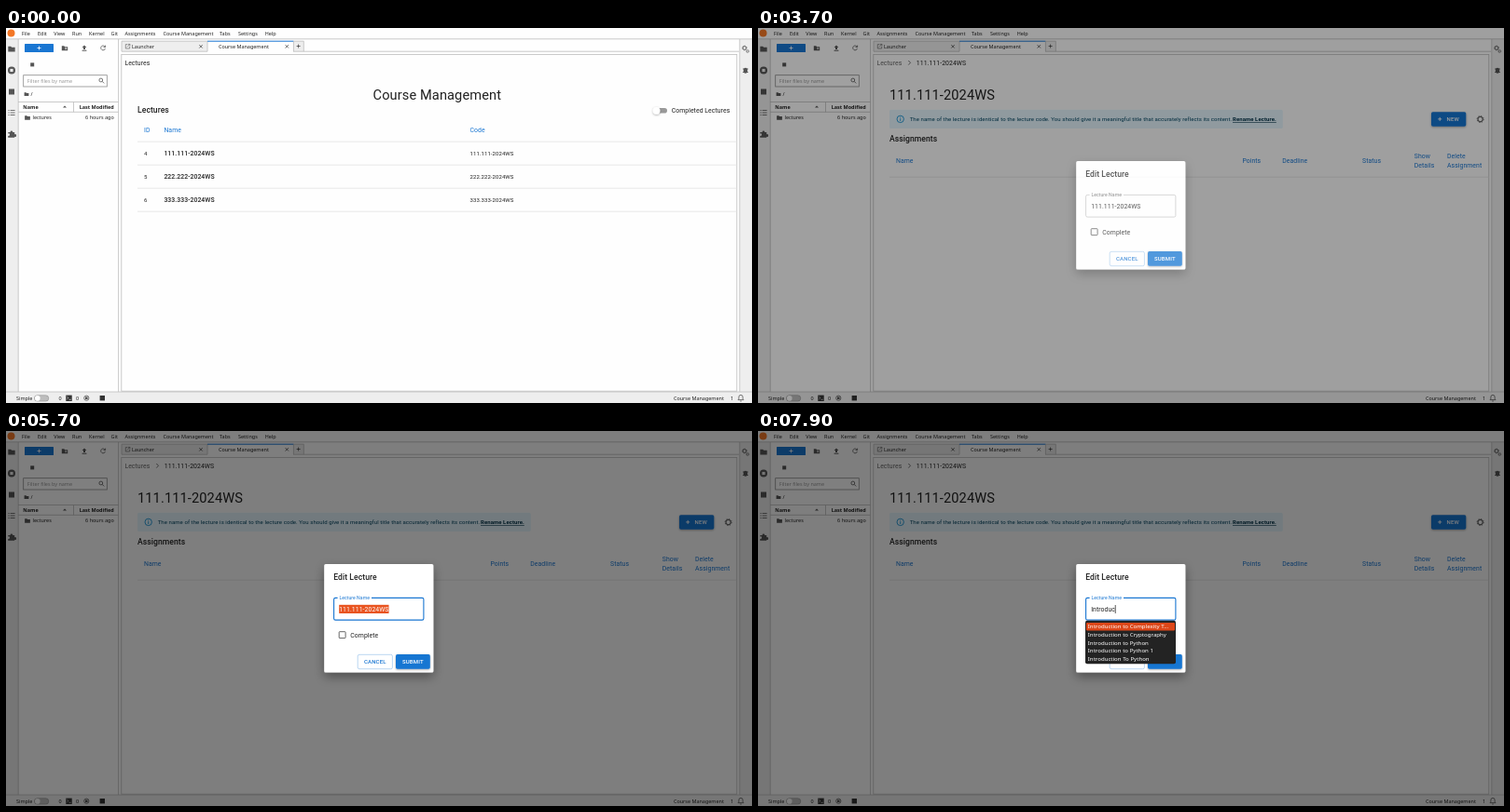
An HTML page that plays this animation: 800x403 px, repeating every 8 s.

```html
<!DOCTYPE html>
<html lang="en">
<head>
<meta charset="utf-8">
<title>Rename a lecture</title>
<style>
  html, body { margin: 0; width: 100%; height: 100%; overflow: hidden; background: #fff; }
  svg { display: block; width: 100vw; height: 100vh; }
  text { white-space: pre; }
  .ui { font: 5.46px "Noto Sans", "Open Sans", sans-serif; fill: #212121; }
  .bold { font-weight: 600; }
  .mui { font: 6.86px Roboto, sans-serif; letter-spacing: .00938em; fill: #212121; }
  .mui.h4 { font-size: 14.6px; letter-spacing: .00735em; }
  .mui.h6 { font-size: 8.58px; font-weight: 500; letter-spacing: .0075em; }
  .mui.small { font-size: 6.02px; letter-spacing: .01071em; }
  .mui.label { font-size: 5.14px; }
  .mui.medium { font-weight: 500; }
  .mui.button { font-size: 6.02px; font-weight: 500; letter-spacing: .02857em; }
  .mui.blue { fill: #1976d2; }
  .mui.gray { fill: #666; }
  .mui.white { fill: #fff; }
  .rule { stroke: #e0e0e0; stroke-width: .7; }
  .edge { stroke: #bdbdbd; stroke-width: .8; fill: none; }
  .icon { fill: #555; }
  .line { fill: none; stroke: #555; stroke-width: .8; }
  .strip { fill: #eee; }
  .menu { font: 6.1px "Noto Sans", "Open Sans", sans-serif; fill: #fff; }
</style>
</head>
<body>
<svg viewBox="0 0 800 403" preserveAspectRatio="none">
  <defs>
    <path id="folder" d="M-3.2-2.4h2.5l.8.9h3.1v4h-6.4z"/>
    <path id="cross" d="M-1.7-1.7 1.7 1.7M1.7-1.7-1.7 1.7"/>
    <path id="plus" d="M-2 0h4M0-2v4"/>
    <g id="gear">
      <circle r="2.6" fill="none" stroke-width="1.3"/>
      <circle r="3.5" fill="none" stroke-width="1" stroke-dasharray="1.3 1.45"/>
    </g>
    <filter id="lift" x="-30%" y="-30%" width="160%" height="170%">
      <feDropShadow dx="0" dy="4.5" stdDeviation="6" flood-opacity=".38"/>
    </filter>
    <filter id="soft" x="-30%" y="-30%" width="160%" height="180%">
      <feDropShadow dx="0" dy=".8" stdDeviation=".8" flood-opacity=".35"/>
    </filter>
  </defs>

  <rect width="800" height="403" fill="#fefefe"/>

  <!-- Window frame -->
  <path class="strip" d="M0 12h13v379H0zM787 12h13v379h-13zM0 391h800v12H0z"/>
  <path class="edge" d="M0 11.8H800M13.2 12V391M120.6 12V391M786.8 12V391M0 391H800"/>
  <circle cx="5.5" cy="5.5" r="4" fill="#f37726"/>
  <g class="ui" id="menubar"></g>

  <!-- Side strips -->
  <use href="#folder" class="icon" transform="translate(6 22.5) scale(1.15)"/>
  <circle cx="6" cy="45.5" r="4" class="icon"/><rect x="4.4" y="43.9" width="3.2" height="3.2" fill="#eee"/>
  <rect x="3" y="65.5" width="6" height="6" class="icon"/>
  <path class="line" d="M2.4 88.5h1.2M4.6 88.5h5M2.4 91h1.2M4.6 91h5M2.4 93.5h1.2M4.6 93.5h5"/>
  <path class="icon" d="M2.3 112h2.2a1.4 1.4 0 1 1 2.8 0h1.9v2.2a1.4 1.4 0 1 1 0 2.6v1h-7v-2a1.3 1.3 0 1 0 0-2.4z"/>
  <use href="#gear" stroke="#555" transform="translate(792 21.5) scale(.7)"/>
  <use href="#gear" stroke="#555" transform="translate(795.3 25) scale(.45)"/>
  <ellipse cx="793" cy="45.7" rx="2.2" ry="3" class="icon"/>
  <path class="line" d="M790 44h6M790 47.5h6"/>

  <!-- File browser -->
  <rect x="20" y="17" width="31" height="9" rx=".5" fill="#1976d2"/>
  <use href="#plus" stroke="#fff" stroke-width=".8" transform="translate(35.5 21.5)"/>
  <use href="#folder" class="icon" transform="translate(63 21.7)"/>
  <path d="M63 22h2.4M64.2 20.8v2.4" stroke="#fff" stroke-width=".6"/>
  <path class="icon" d="M84 18.4l2.4 2.5h-1.4v2h-2v-2h-1.4zM81.6 23.8h4.8v.9h-4.8z"/>
  <path class="line" d="M106.2 20.2a2.4 2.4 0 1 0 .2 2M106.6 18.6v2h-2"/>
  <rect x="26.2" y="37.4" width="4" height="4" class="icon"/>
  <rect x="18.7" y="50.7" width="89.6" height="12.3" fill="#fff" stroke="#8c8c8c" stroke-width=".8"/>
  <text class="ui" x="22.8" y="58.9" style="fill:#999">Filter files by name</text>
  <circle cx="101.8" cy="56" r="1.9" class="line"/><path class="line" d="M103.2 57.4l2 2"/>
  <use href="#folder" class="icon" transform="translate(22 71) scale(.75)"/>
  <text class="ui" x="26.5" y="73">/</text>
  <path class="edge" d="M13 79.5h107.5M13 90.3h107.5M72.5 79.5v10.8"/>
  <text class="ui bold" x="18.3" y="87">Name</text>
  <path class="icon" d="M61 85.6l2-2.2 2 2.2z"/>
  <text class="ui bold" x="115.7" y="87" text-anchor="end">Last Modified</text>
  <use href="#folder" class="icon" transform="translate(23 96.4) scale(.9)"/>
  <text class="ui" x="28.5" y="98.3">lectures</text>
  <text class="ui" x="115.7" y="98.3" text-anchor="end">6 hours ago</text>

  <!-- Tabs and panel -->
  <path class="strip" d="M124 14.2h92v11h-92zM308 14.2h11.3v11H308z"/>
  <path class="edge" d="M124 25.2V14.2h92v11M308.4 14.2h10.9v11M124 25.2h92M308 25.2h478"/>
  <path d="M216 14.2h92.4" stroke="#1976d2"/>
  <path class="edge" d="M308.4 14.6v10.6"/>
  <path class="line" d="M130.5 17.6h-2.2v4.4h4.4v-2.2M130 20.3l2.7-2.7M131 17.4h1.9v1.9" style="stroke-width:.6"/>
  <text class="ui" x="135" y="21.6">Launcher</text>
  <text class="ui" x="228" y="21.6">Course Management</text>
  <g stroke="#333" stroke-width=".7">
    <use href="#cross" x="209" y="19.8"/><use href="#cross" x="301.3" y="19.8"/><use href="#plus" x="313.6" y="19.5"/>
  </g>
  <rect x="123.8" y="28.4" width="660" height="361.8" class="edge"/>

  <!-- Status bar -->
  <text class="ui" x="11" y="400">Simple</text>
  <rect x="30.4" y="394.7" width="15.4" height="6.4" rx="3.2" fill="#bdbdbd" stroke="#777" stroke-width=".4"/>
  <circle cx="33.8" cy="397.9" r="2.8" fill="#fff"/>
  <text class="ui" x="56.4" y="400">0</text>
  <rect x="64.3" y="394.6" width="6.4" height="6.4" class="icon" style="fill:#333"/>
  <path d="M65.5 396.2l1.4 1.3-1.4 1.3M67.6 399.3h2" fill="none" stroke="#fff" stroke-width=".6"/>
  <text class="ui" x="75" y="400">0</text>
  <circle cx="86.3" cy="397.7" r="2.6" class="line"/><rect x="85" y="396.4" width="2.6" height="2.6" class="icon"/>
  <rect x="100.6" y="395" width="5.4" height="5.4" class="icon" style="fill:#333"/>
  <text class="ui" x="716" y="400">Course Management</text>
  <text class="ui" x="777" y="400">1</text>
  <path class="line" d="M785 399.6h6l-.9-1.3v-1.8a2.1 2.1 0 0 0-4.2 0v1.8zM787.2 401h1.6" stroke-linejoin="round"/>

  <!-- Lecture list -->
  <g id="list">
    <rect id="hover" x="141" y="122.4" width="642.5" height="24.4" fill="#f5f5f5"/>
    <text class="mui" x="127.4" y="39.6">Lectures</text>
    <text class="mui h4" x="462.3" y="76.8" text-anchor="middle">Course Management</text>
    <text class="mui h6" x="141" y="90.6">Lectures</text>
    <rect x="695.5" y="86" width="13.5" height="5.6" rx="2.8" fill="#999"/>
    <circle cx="697.6" cy="88.8" r="3.9" fill="#fff" filter="url(#soft)"/>
    <text class="mui" x="713.7" y="91.1">Completed Lectures</text>
    <text class="mui blue" x="148" y="112.3">ID</text>
    <text class="mui blue" x="169.4" y="112.3">Name</text>
    <text class="mui blue" x="497.5" y="112.3">Code</text>
    <g id="rows"></g>
  </g>

  <!-- Single lecture -->
  <g id="lecture">
    <text class="mui gray" x="127.4" y="39.6">Lectures</text>
    <path class="line" d="M161.3 35l2.2 2.3-2.2 2.3"/>
    <text class="mui" x="169.8" y="39.6">111.111-2024WS</text>
    <text class="mui h4" x="141" y="76.8">111.111-2024WS</text>
    <rect x="141" y="87.7" width="421.8" height="20.4" rx="1.7" fill="#e5f6fd"/>
    <circle cx="152.7" cy="97.9" r="3.7" fill="none" stroke="#0288d1" stroke-width=".8"/>
    <path d="M152.7 97.3v2.6M152.7 95.6v.9" stroke="#0288d1" stroke-width=".8"/>
    <text class="mui small" x="162.7" y="100" style="fill:#014361">The name of the lecture is identical to the lecture code. You should give it a meaningful title that accurately reflects its content.</text>
    <text class="mui small" x="509" y="100" style="fill:#013047;font-weight:700;text-decoration:underline">Rename Lecture.</text>
    <rect x="722" y="90.2" width="37.3" height="15.6" rx="1.7" fill="#1976d2" filter="url(#soft)"/>
    <use href="#plus" x="731.2" y="97.9" stroke="#fff" stroke-width=".9"/>
    <text class="mui button white" x="738.6" y="100.1">NEW</text>
    <use href="#gear" x="774.6" y="98" stroke="#666"/>
    <text class="mui h6" x="141" y="121.6">Assignments</text>
    <g id="heads"></g>
    <path class="rule" d="M141 160.2h642.5"/>
  </g>

  <!-- Dialog -->
  <g id="dialog">
    <rect width="800" height="403" opacity=".5"/>
    <rect x="341.2" y="143" width="117.2" height="116.6" rx="1.7" fill="#fff" filter="url(#lift)"/>
    <text class="mui h6" x="351.2" y="159.9">Edit Lecture</text>
    <rect id="outline" x="351.6" y="179.4" width="96.3" height="23.7" rx="1.7" fill="none"/>
    <rect x="355.6" y="177.5" width="36.4" height="4" fill="#fff"/>
    <text id="label" class="mui label" x="357.4" y="181.2">Lecture Name</text>
    <rect id="selection" y="186.8" height="9.2" fill="#e95420"/>
    <text id="field" class="mui" x="357.2" y="193.7"><tspan></tspan><tspan fill="#fff"></tspan></text>
    <path id="caret" d="M0 187v9" stroke="#111" stroke-width=".7"/>
    <rect x="357.2" y="215.7" width="6.9" height="6.9" rx=".6" fill="none" stroke="#555" stroke-width=".9"/>
    <text class="mui" x="369.3" y="221.5">Complete</text>
    <rect x="377.2" y="240.3" width="37.2" height="15.4" rx="1.7" fill="none" stroke="#8cbae8" stroke-width=".6"/>
    <text class="mui button blue" x="395.8" y="250.1" text-anchor="middle">CANCEL</text>
    <rect x="418" y="240.1" width="36.8" height="15.7" rx="1.7" fill="#1976d2" filter="url(#soft)"/>
    <text class="mui button white" x="436.4" y="250.1" text-anchor="middle">SUBMIT</text>
    <g id="popup">
      <rect x="351" y="203.8" width="97" height="46.4" rx="2" fill="#232323"/>
      <rect id="picked" x="352" y="205.9" width="95" height="8.5" rx=".8" fill="#dd4719"/>
      <g id="options"></g>
    </g>
  </g>
</svg>
<script>
  const LOOP = 8000;
  const el = id => document.getElementById(id);
  const label = (cls, x, y, text) => `<text class="${cls}" x="${x}" y="${y}">${text}</text>`;

  const menus = { File: 17, Edit: 34, View: 51.3, Run: 71, Kernel: 89, Git: 112.5, Assignments: 127.5,
    'Course Management': 168.5, Tabs: 229, Settings: 249, Help: 277.7 };
  el('menubar').innerHTML = Object.entries(menus).map(([name, x]) => label('ui', x, 7.7, name)).join('');

  el('rows').innerHTML = '<path class="rule" d="M141 122.2h642.5"/>' + [1, 2, 3].map((n, i) => {
    const y = 136.8 + 25 * i, code = `${n}${n}${n}.${n}${n}${n}-2024WS`;
    return label('mui small', 148, y - .2, i + 4) + label('mui medium', 169.4, y, code) +
      label('mui small', 497.5, y - .2, code) + `<path class="rule" d="M141 ${147.2 + 25 * i}h642.5"/>`;
  }).join('');

  el('heads').innerHTML = [
    ['Name', 148, 145.3], ['Points', 519.4, 145.3], ['Deadline', 562.2, 145.3], ['Status', 648, 145.3],
    ['Show', 703.8, 140.2], ['Details', 703.8, 150.4], ['Delete', 739, 140.2], ['Assignment', 739, 150.4]
  ].map(([name, x, y]) => label('mui blue', x, y, name)).join('');

  el('options').innerHTML = ['to Complexity T...', 'to Cryptography', 'to Python', 'to Python 1', 'To Python']
    .map((end, i) => label('menu', 353.8, 212.3 + 8.6 * i, 'Introduction ' + end)).join('');

  // Field content over time: [start, text, selected characters at the end]
  const OLD = '111.111-2024WS';
  const typing = [
    [0, OLD, 0], [5100, OLD, 2], [5200, OLD, 6], [5300, OLD, 10], [5400, OLD, 14],
    [6100, 'I', 0], [6500, 'In', 0], [6600, 'Int', 0], [6800, 'Intr', 0], [7000, 'Intro', 0],
    [7200, 'Introd', 0], [7300, 'Introdu', 0], [7400, 'Introduc', 0]
  ];
  const fade = [[0, 0], [3700, .74], [3800, 1]];
  const latest = (steps, t) => steps.filter(([start]) => start <= t).pop();
  const show = (id, on) => el(id).setAttribute('visibility', on ? 'inherit' : 'hidden');

  function drawField(t) {
    const [, text, count] = latest(typing, t);
    const focused = t >= 5000, field = el('field'), [plain, marked] = field.children;
    plain.textContent = text.slice(0, text.length - count);
    marked.textContent = text.slice(text.length - count);
    const left = 357.2 + plain.getComputedTextLength();
    el('selection').setAttribute('x', left);
    el('selection').setAttribute('width', count ? marked.getComputedTextLength() : 0);
    el('caret').setAttribute('transform', `translate(${left + .2})`);
    show('caret', focused && !count);
    el('outline').setAttribute('stroke', focused ? '#1976d2' : '#b5b5b5');
    el('outline').setAttribute('stroke-width', focused ? 1.1 : .7);
    el('label').style.fill = focused ? '#1976d2' : '#666';
  }

  function draw(t) {
    show('list', t < 1100);
    show('hover', t >= 500 && t < 1100);
    show('lecture', t >= 1100);
    el('dialog').setAttribute('opacity', latest(fade, t)[1]);
    drawField(t);
    show('popup', t >= 6200);
    show('picked', t >= 7800);
  }

  let start;
  function tick(now) {
    start ??= now;
    draw((now - start) % LOOP);
    requestAnimationFrame(tick);
  }
  draw(0);
  requestAnimationFrame(tick);
</script>
</body>
</html>
```
